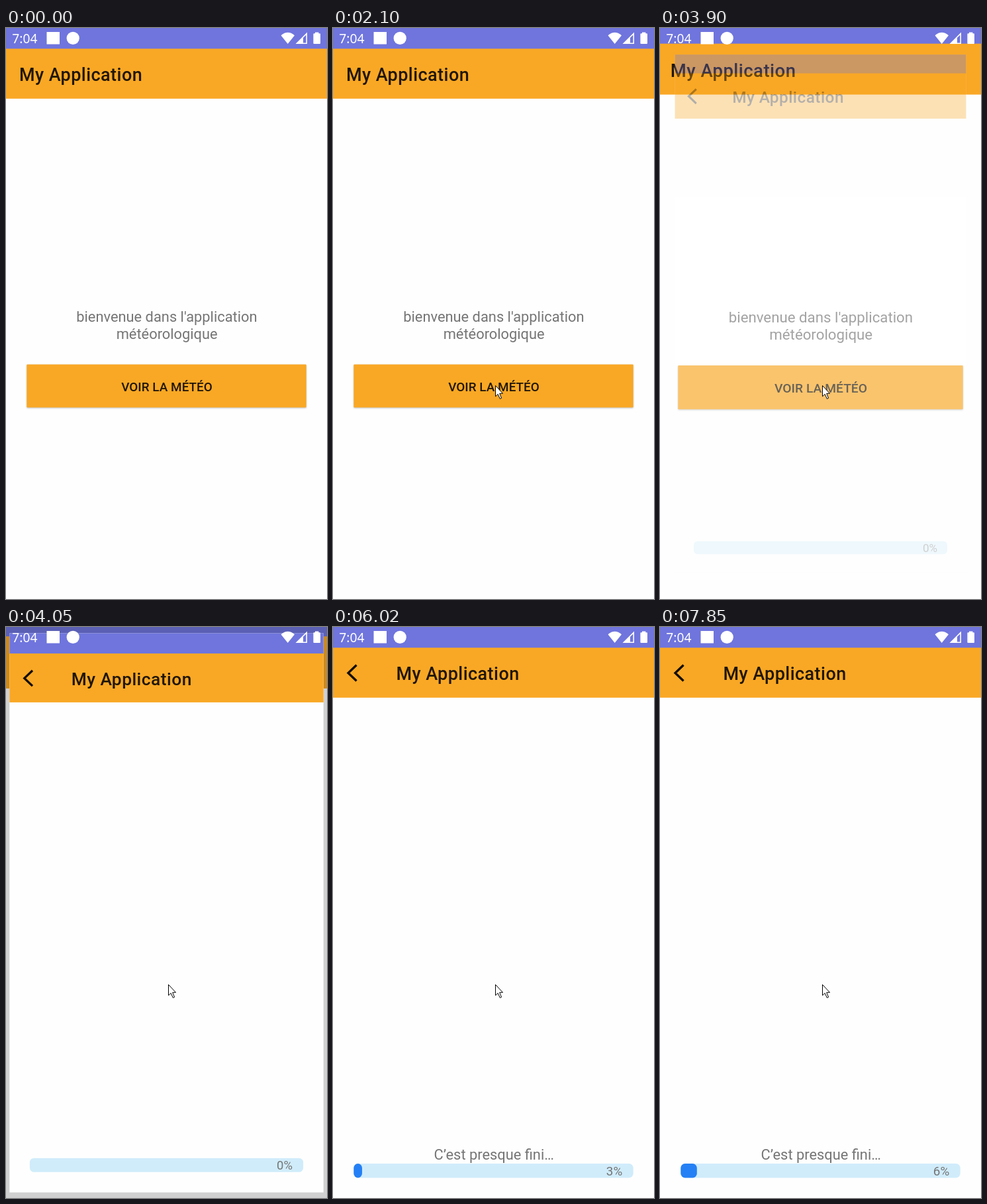
An HTML page for the animation above (8 s loop, 485 by 863 pixels).

```html
<!DOCTYPE html>
<html lang="fr">
<head>
<meta charset="utf-8">
<title>My Application</title>
<style>
  html, body { margin: 0; width: 100%; height: 100%; overflow: hidden; background: #fefefe; }
  svg { display: block; width: 485px; height: 863px; }
  text { font-family: Roboto, sans-serif; }
  .title { font-size: 26.94px; font-weight: 500; letter-spacing: .46px; fill: #201605; }
  .body { font-size: 21.85px; fill: #757575; text-anchor: middle; }
  .label { font-size: 18.86px; font-weight: 500; letter-spacing: .05px; fill: #201605; text-anchor: middle; }
  .percent { font-size: 18.86px; fill: #757575; }
  .clock { font: 19.2px "Noto Sans", sans-serif; }
</style>
</head>
<body>
<svg viewBox="0 0 485 863">
  <defs>
    <g id="frame">
      <rect width="485" height="864" fill="#fefefe"/>
      <rect width="485" height="32" fill="#6f75dd"/>
      <rect y="31.3" width="485" height="75.5" fill="#f9a825"/>
    </g>
  </defs>

  <g id="home">
    <use href="#frame"/>
    <text class="title" x="20" y="80.3">My Application</text>
    <text class="body" x="242.9" y="444.3">bienvenue dans l'application</text>
    <text class="body" x="243.2" y="470.2">météorologique</text>
    <rect id="button" x="31.3" y="508.5" width="422.4" height="65" rx="1" fill="#f9a825"/>
    <text class="label" x="243" y="548.5">VOIR LA MÉTÉO</text>
  </g>

  <rect id="scrim" width="485" height="863"/>

  <g id="loading">
    <use href="#frame"/>
    <path d="M35.5 57.5 23 69.5 35.5 81.5" fill="none" stroke="#140e03" stroke-width="3.4"/>
    <text class="title" x="95.5" y="80.3">My Application</text>
    <text class="body" id="message" x="243.2" y="805">C’est presque fini…</text>
    <rect x="31.3" y="811" width="422.4" height="21.5" rx="6.5" fill="#d0ecfb"/>
    <rect id="bar" x="31.3" y="811" height="21.5" ry="6.5" fill="#2580f5"/>
    <text class="percent" id="percent" x="412.8" y="829"></text>
  </g>

  <g fill="#fff">
    <text class="clock" x="9.3" y="22.8">7:04</text>
    <rect x="61.5" y="6" width="19.5" height="18.5"/>
    <circle cx="101.2" cy="15.4" r="9.6"/>
    <path d="M415.5 11.2Q425.7 2.4 436 11.2L425.7 24Z"/>
    <path d="M455 6.5V24H437.5Z M453.4 10.4 449 14.8V22.4H453.4Z" fill-rule="evenodd"/>
    <path d="M467 6.4h5.4v1.8h1.6q1 0 1 1v13.9q0 1-1 1h-8.6q-1 0-1-1V9.2q0-1 1-1h1.6z"/>
  </g>

  <path id="cursor" d="M.5.5V16.8L4.2 13.4 7.3 20.4 9.6 19.4 6.7 12.3H11.5Z" fill="#fff" stroke="#000"/>
</svg>

<script>
const LOOP = 8000;
const $ = id => document.getElementById(id);
const set = (id, attributes) => {
  for (const name in attributes) $(id).setAttribute(name, attributes[name]);
};
const clamp = v => Math.min(1, Math.max(0, v));
const smooth = u => u * u * (3 - 2 * u);
const zoom = s => `translate(242.5 432) scale(${s}) translate(-242.5 -432)`;

// The pointer appears, is nudged, then glides to the button in 135 ms ticks.
function cursorAt(t) {
  if (t < 500) return [-50, -50];
  if (t < 650) return [302, 766];
  if (t < 1020) return [293, 752];
  const left = Math.max(0, 8 - Math.floor((t - 1020) / 135));
  return [245 + Math.round(left ** 2 / 2), 540 + Math.round(4.9 * left ** 1.6)];
}

// The screen change is shown in 150 ms ticks.
function openingAt(t) {
  const shown = 3900 + 150 * Math.floor((t - 3900) / 150);
  return t < 3900 ? 0 : smooth(clamp((shown - 3715) / 441));
}

function drawProgress(t) {
  const count = Math.max(0, Math.floor((t - 4880) / 990) + 1);
  const percent = n => Math.max(0, Math.floor(n * 5 / 3));
  const settling = count > 0 && (t - 4880) % 990 < 135;
  const gain = percent(count) - percent(count - 1);
  const width = 4.224 * (percent(count) - (settling ? .2 * gain : 0));
  $('percent').textContent = percent(count) + '%';
  set('bar', { width, rx: Math.min(6.5, width / 2) });
}

function draw(t) {
  set('cursor', { transform: `translate(${cursorAt(t)})` });

  const opening = openingAt(t);
  set('home', { transform: zoom(1 + .05 * opening) });
  set('scrim', { opacity: .38 * clamp(opening - .38) });
  set('loading', { transform: zoom(.85 + .15 * opening), opacity: clamp((opening - .2) / .55) });
  set('message', { opacity: opening === 1 ? 1 : 0 });

  const pressed = t >= 3650 && t < 3900;
  $('button').style.filter = pressed
    ? 'drop-shadow(0 3px 3px rgba(0,0,0,.28))'
    : 'drop-shadow(0 1.4px 1px rgba(0,0,0,.25))';

  drawProgress(t);
}

const start = performance.now();
function tick() {
  draw((performance.now() - start) % LOOP);
  requestAnimationFrame(tick);
}
tick();
</script>
</body>
</html>
```
